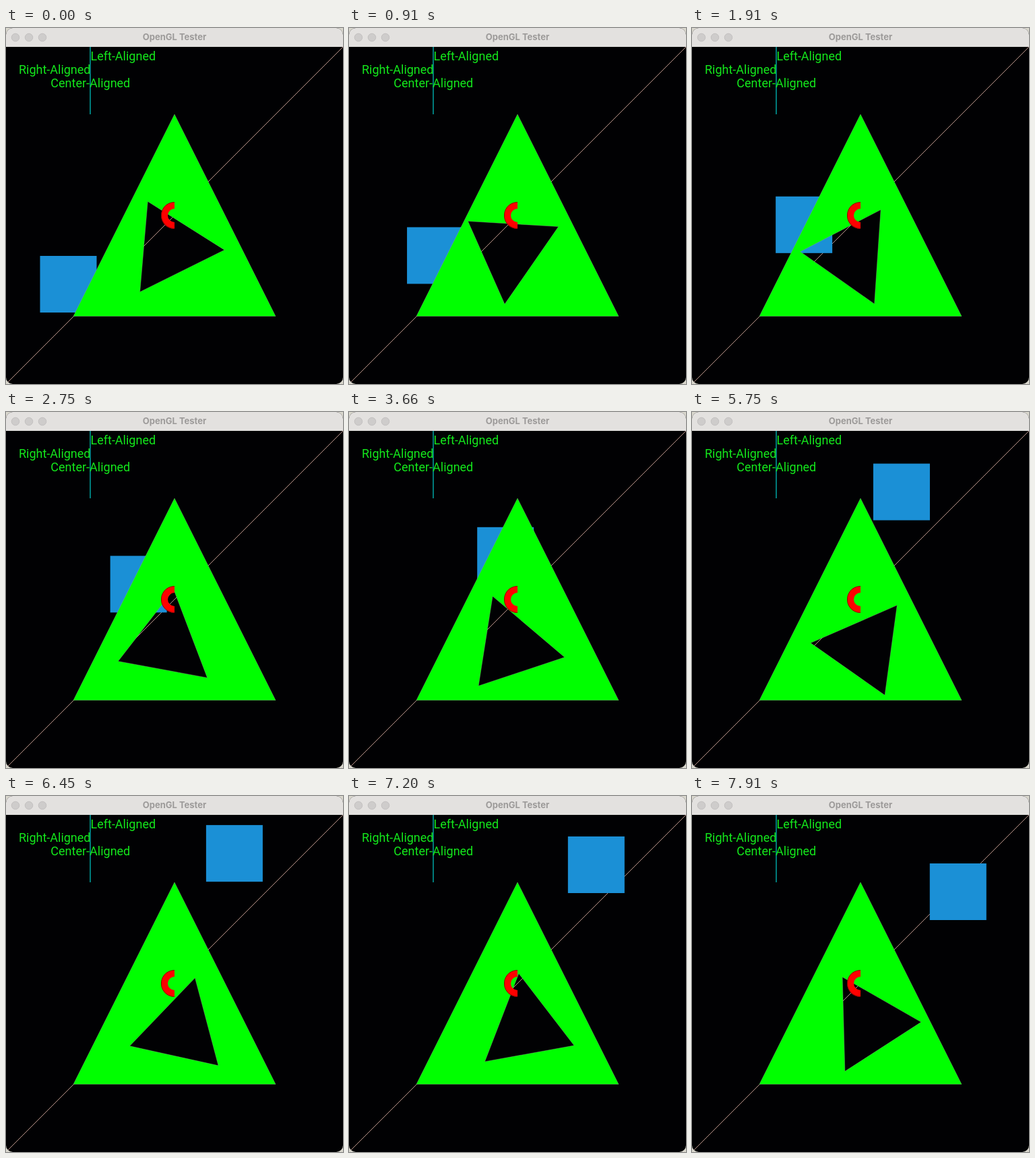
An HTML page that plays this animation: 500x528 px, repeating every 8 s.

```html
<!DOCTYPE html>
<html lang="en">
<head>
<meta charset="utf-8">
<title>OpenGL Tester</title>
<style>
  html, body { margin: 0; width: 100%; height: 100%; overflow: hidden; background: #d9d7cd; }
  svg { display: block; width: 500px; height: 528px; }
  .title { font: 700 13px Inter, sans-serif; fill: #9c9a99; text-anchor: middle; }
  .labels { font: 18px Roboto, sans-serif; fill: #14e81c; }
</style>
</head>
<body>
<svg viewBox="0 0 500 528">
  <defs>
    <clipPath id="window"><rect width="500" height="528" rx="10"/></clipPath>
  </defs>
  <g clip-path="url(#window)">
    <rect width="500" height="528" fill="#010103"/>
    <path d="M0 528L500 28" stroke="#b8938a" stroke-width="1"/>
    <rect id="badge" width="84" height="84" fill="#1b90d6"/>
    <path id="triangle" fill="#00ff00" fill-rule="evenodd" stroke="#84a880" stroke-width=".7" stroke-opacity=".6"/>
    <path d="M250 258A20 20 0 0 0 250 298V288A10 10 0 0 1 250 268Z" fill="#ff0000"/>
    <path d="M250 258.5A19.5 19.5 0 0 0 250 297.5" fill="none" stroke="#400800" stroke-opacity=".6"/>
    <rect x="124" y="28" width="2" height="100" fill="#007a7a"/>
    <g class="labels">
      <text x="125.5" y="48">Left-Aligned</text>
      <text x="125.5" y="68" text-anchor="end">Right-Aligned</text>
      <text x="125.3" y="88" text-anchor="middle">Center-Aligned</text>
    </g>
    <rect width="500" height="28" fill="#e3e1df"/>
    <g fill="#cecccb" stroke="#bebcbb" stroke-width=".8">
      <circle cx="14" cy="14" r="5.8"/>
      <circle cx="34" cy="14" r="5.8"/>
      <circle cx="54" cy="14" r="5.8"/>
    </g>
    <text class="title" x="250" y="18.3">OpenGL Tester</text>
  </g>
</svg>
<script>
  const LOOP = 8000;
  const PIVOT = { x: 250.2, y: 337.7 };
  const HOLE = [[89.8, 0], [-25.2, 70], [-25.2, -70]];
  const badge = document.getElementById('badge');
  const triangle = document.getElementById('triangle');

  // The scene advances 15 times a second, seen through a 24 fps clock on a 10 ms grid.
  function stepAt(time) {
    const tick = Math.floor((time - time % 10 + 9.99) * 0.024);
    return Math.floor(tick * 5 / 8 + 0.3);
  }

  function holePath(degrees) {
    const a = degrees * Math.PI / 180, cos = Math.cos(a), sin = Math.sin(a);
    const points = HOLE.map(([x, y]) =>
      `${(PIVOT.x + x * cos - y * sin).toFixed(2)} ${(PIVOT.y + x * sin + y * cos).toFixed(2)}`);
    return `M${points.join('L')}Z`;
  }

  function draw(time) {
    const step = stepAt(time);
    const x = 50.5 + 2.54 * step;
    const rising = 338 - 3.04 * step;
    const falling = 60 + 3.636 * (step - 108); // faster after the bounce at the top
    badge.setAttribute('x', x);
    badge.setAttribute('y', Math.max(rising, falling));
    triangle.setAttribute('d', 'M250 128L400 427.5H100Z' + holePath(243.6 - 2.06 * step));
  }

  function loop() {
    draw(performance.now() % LOOP);
    requestAnimationFrame(loop);
  }
  loop();
</script>
</body>
</html>
```
